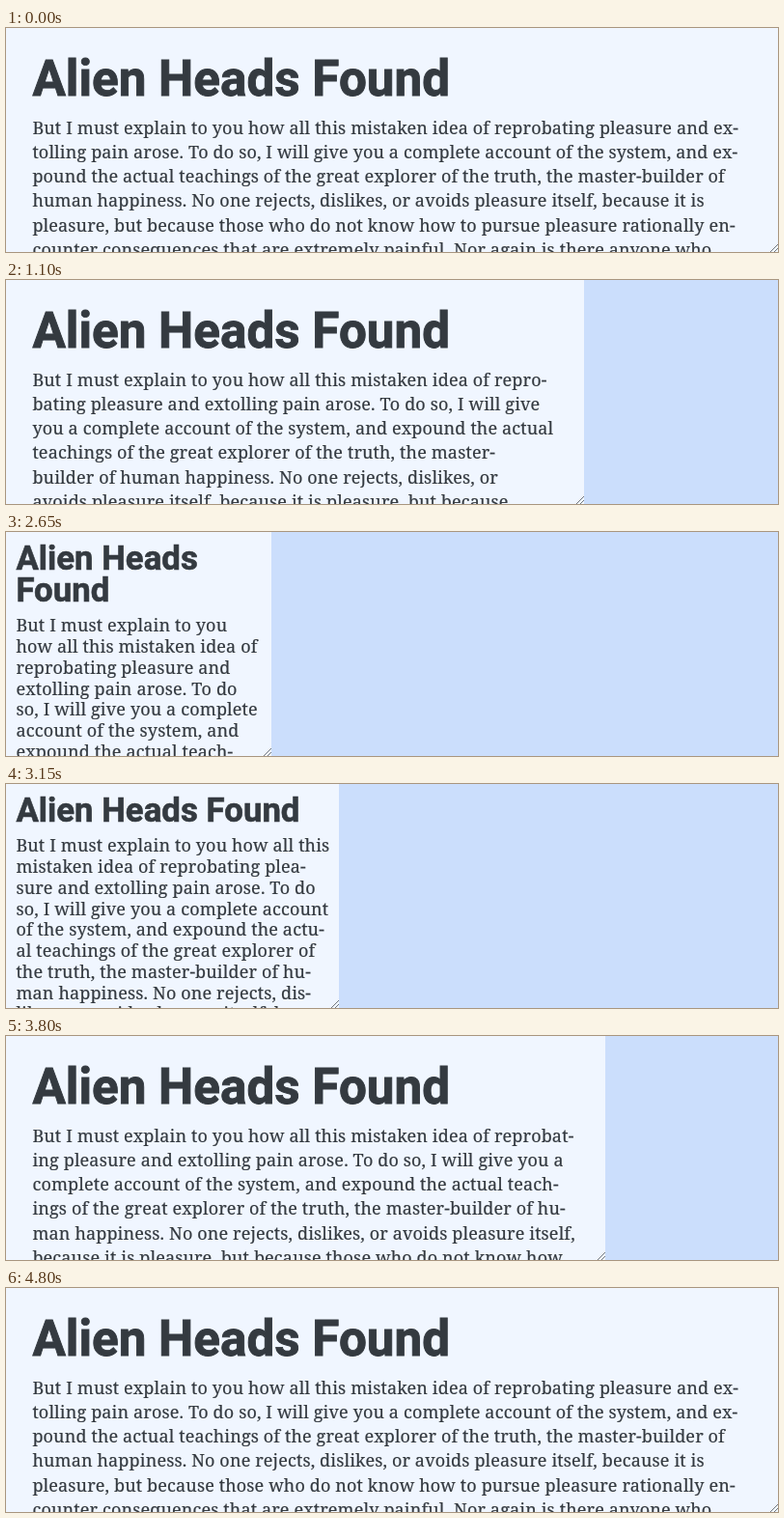
Animation of 800 by 232 pixels, one loop 4850 ms. Source, as an HTML page:

```html
<!DOCTYPE html>
<html lang="en">
<head>
<meta charset="utf-8">
<title>Resizable article</title>
<style>
  html, body { margin: 0; width: 100%; height: 100%; overflow: hidden; background: #cbdefc; }

  .panel {
    position: relative;
    width: 800px;
    height: 232px;
    overflow: hidden;
    container-type: inline-size;
    background: #f0f6ff;
    color: #343a40;
    animation: resize 4850ms ease-in-out infinite;
  }

  /* hold, shrink, hold, grow, hold */
  @keyframes resize {
    0%, 5.67% { width: 800px; }
    45.18%, 54.91% { width: 275px; }
    94.41%, 100% { width: 800px; }
  }

  article { padding: 10.6px 10px 0 10.4px; }
  h1 {
    margin: 0 0 9.7px;
    font: bold 34.8px/33px Roboto, sans-serif;
    -webkit-text-stroke: .6px;
  }
  p {
    margin: 0;
    font: 18px/21.75px "Noto Serif", serif;
    letter-spacing: .14px;
    -webkit-text-stroke: .2px;
    hyphens: manual;
    hyphenate-character: "-\200A"; /* hair space widens the hyphen */
  }

  @container (min-width: 500px) {
    article { padding: 28.5px 30px 0 27.4px; }
    h1 { margin-bottom: 14px; font-size: 51.2px; line-height: 48px; -webkit-text-stroke-width: .9px; }
    p { line-height: 25.3px; }
  }

  .grip { position: absolute; right: 0; bottom: 0; width: 8px; height: 8px; stroke: #6f7680; }
</style>
</head>
<body>
<div class="panel">
  <article>
    <h1>Alien Heads Found</h1>
    <p>But I must ex&shy;plain to you how all this mis&shy;tak&shy;en idea of re&shy;pro&shy;bat&shy;ing plea&shy;sure and ex&shy;tolling pain arose. To do so, I will give you a com&shy;plete ac&shy;count of the sys&shy;tem, and ex&shy;pound the ac&shy;tu&shy;al teach&shy;ings of the great ex&shy;plor&shy;er of the truth, the master-builder of hu&shy;man hap&shy;pi&shy;ness. No one re&shy;jects, dis&shy;likes, or avoids plea&shy;sure it&shy;self, be&shy;cause it is plea&shy;sure, but be&shy;cause those who do not know how to pur&shy;sue plea&shy;sure ra&shy;tio&shy;nal&shy;ly en&shy;counter con&shy;se&shy;quences that are ex&shy;treme&shy;ly painful. Nor again is there any&shy;one who loves or pur&shy;sues or de&shy;sires to ob&shy;tain pain of it&shy;self.</p>
  </article>
  <svg class="grip" viewBox="0 0 8 8"><path d="M0 8 8 0M4 8 8 4"/></svg>
</div>
</body>
</html>
```
